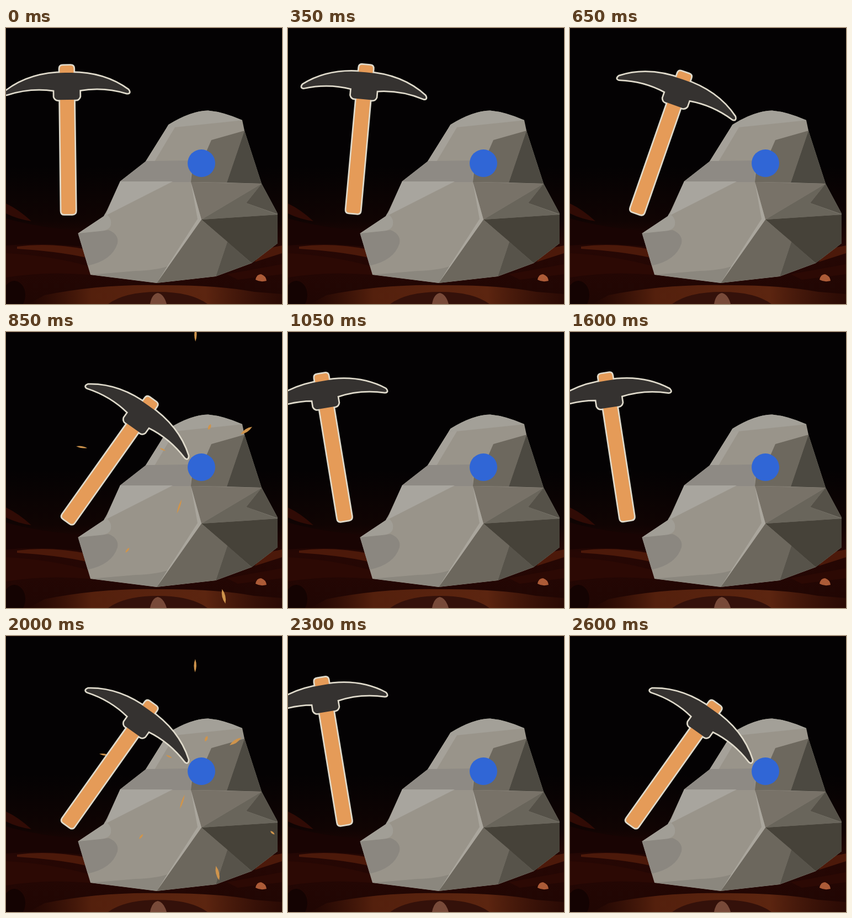
An HTML page that plays this animation: 500x500 px, repeating every 2650 ms.

```html
<!DOCTYPE html>
<html lang="en">
<head>
<meta charset="utf-8">
<title>Pickaxe and rock</title>
<style>
  html, body { margin: 0; width: 100%; height: 100%; overflow: hidden; background: #040203; }
  svg { display: block; width: 100vw; height: 100vh; }
  .outline { fill: none; stroke: #dfdacb; stroke-width: 5.5; stroke-linejoin: round; }
</style>
</head>
<body>
<svg viewBox="0 0 500 500">
  <defs>
    <linearGradient id="sky" x1="0" y1="0" x2="0" y2="1">
      <stop offset=".5" stop-color="#040203"/>
      <stop offset=".7" stop-color="#100403"/>
      <stop offset=".8" stop-color="#260704"/>
      <stop offset="1" stop-color="#200603"/>
    </linearGradient>
    <linearGradient id="mound" x1="0" y1="0" x2="1" y2="0">
      <stop offset="0" stop-color="#451707" stop-opacity="0"/>
      <stop offset=".25" stop-color="#54200d"/>
      <stop offset=".7" stop-color="#5c2510"/>
      <stop offset="1" stop-color="#3a1107" stop-opacity=".4"/>
    </linearGradient>
    <clipPath id="edge">
      <path id="body" d="M130.500 372L177 341L183 330L207 277.500L253 241.500L294.500 175Q335 150 366 149.500Q394 152 428 167L432 186L463 282L492 336V390L445 426L380 450L273 462L153 447Z"/>
    </clipPath>
    <path id="handle" d="M-12.500 -210V-8Q-12.500 -2.500 -7 -2.500H7Q13 -2.500 13 -8L12.500 -266Q12.500 -271.500 7 -271.500H-7Q-12.500 -271.500 -12.500 -266Z"/>
    <path id="head" d="M0 -258.500Q66 -260 111 -226Q115 -220 109 -220.500Q66 -234 23 -227V-215Q21 -209.500 16 -209.500H-16Q-21 -209.500 -23 -215V-227Q-66 -234 -109 -220.500Q-115 -220 -111 -226Q-66 -260 0 -258.500Z"/>
  </defs>

  <rect width="500" height="500" fill="url(#sky)"/>
  <rect width="500" height="1" fill="#1a0a08"/>
  <g>
    <path d="M0 318Q22 328 46 350Q20 346 0 336Z" fill="#300b05"/>
    <path d="M0 345Q60 362 140 368V396Q60 388 0 394Z" fill="#190403"/>
    <path d="M20 396Q80 388 150 402L146 416Q90 404 20 400Z" fill="#4c190a"/>
    <path d="M0 408Q80 412 152 432V447Q70 440 0 452Z" fill="#2c0904"/>
    <path d="M470 400L500 394V408L450 424Z" fill="#4c190a"/>
    <path d="M400 446L500 428V446L420 456Z" fill="#2c0904"/>
    <path d="M70 484Q170 464 275 466Q380 465 450 478L500 482V500H40Z" fill="url(#mound)"/>
    <path d="M185 500Q215 478 275 478Q335 478 365 500Z" fill="#34110a"/>
    <ellipse cx="15" cy="484" rx="20" ry="26" fill="#140302"/>
    <path d="M261 500Q264 482 275 480Q286 482 291 500Z" fill="#784a39"/>
    <path d="M452 456Q454 446 462 446Q471 449 472 458Q461 461 452 456Z" fill="#ac5b37"/>
  </g>

  <use href="#body" fill="#99948a"/>
  <g clip-path="url(#edge)">
    <path d="M252 242L294 175L306 180L269 242Z" fill="#a5a199"/>
    <path d="M285 180L340 140H400L430 167L295 181Z" fill="#a3a098"/>
    <path d="M254 241L335 240V279H205Z" fill="#8e8a84"/>
    <path d="M432 186L372 203L362 226L338 250L335 279L400 280Z" fill="#6d685e"/>
    <path d="M432 186L464 282L400 280Z" fill="#4c4941"/>
    <path d="M206 278H302L180 340Z" fill="#a8a59e"/>
    <path d="M335 279L463 282L354 347Z" fill="#787268"/>
    <path d="M463 282L435 317L493 338L354 347Z" fill="#69655b"/>
    <path d="M463 282L494 338L435 317Z" fill="#555148"/>
    <path d="M354 347L493 338V392L445 426Z" fill="#464239"/>
    <path d="M354 347L401 387L380 450L273 462Z" fill="#6c675d"/>
    <path d="M401 387L445 426L380 450Z" fill="#57534a"/>
    <path d="M335 279L354 347L273 462L292 432L347 346Z" fill="#aaa69d"/>
    <path d="M153 447L235 440Q270 439 292 432L273 462Z" fill="#8b877e"/>
    <path d="M130 372L186 366Q205 374 202 390Q192 422 146 431Z" fill="#8b8780"/>
    <path d="M130 372L180 336Q192 344 190 356Q188 367 170 368Z" fill="#a19e96"/>
  </g>
  <circle cx="354" cy="245" r="25" fill="#3066d6"/>

  <g id="sparks" fill="#cf944c"></g>
  <g id="pick">
    <g class="outline"><use href="#handle"/><use href="#head"/></g>
    <use href="#handle" fill="#e59b58"/>
    <use href="#head" fill="#353230"/>
  </g>
</svg>
<script>
  const LOOP = 2650, STEP = 50, SWING = 600;
  const REST = -9.3, STRIKE = 35.4;
  const HIT = 115, LIFT = 251, MOVE = 160;   // ms within a swing
  const CHIPS = 9, FLIGHT = 150;

  const pick = document.getElementById('pick');
  const sparks = document.getElementById('sparks');

  function ease(x) {
    const u = Math.min(1, Math.max(0, x));
    return u * u * (3 - 2 * u);
  }

  function seeded(seed) {
    return () => (seed = (seed * 16807) % 2147483647) / 2147483647;
  }

  const random = seeded(41);
  const chips = Array.from({ length: CHIPS }, (_, i) => {
    const el = document.createElementNS('http://www.w3.org/2000/svg', 'path');
    const w = 5 + 10 * random(), h = 2 + 4 * random();
    el.setAttribute('d', `M${-w} 0Q0 ${-h} ${w} 0Q0 ${h} ${-w} 0Z`);
    sparks.append(el);
    return { el, angle: (i + random()) * 360 / CHIPS, reach: 45 + 215 * random() ** 2 };
  });

  // The blow starts just before a swing ends and lands in the next one
  function swingAngle(t) {
    const blow = start => ease((t - start) / MOVE);
    const raised = blow(HIT - MOVE) - blow(LIFT) + blow(SWING + HIT - MOVE);
    return REST + (STRIKE - REST) * raised;
  }

  function drawPick(angle) {
    const x = 119.8 - 0.0275 * (angle - 15) ** 2;
    const y = 336.8 + 0.0146 * (angle - 13) ** 2;
    pick.setAttribute('transform', `translate(${x} ${y}) rotate(${angle})`);
  }

  function drawSparks(age) {
    const flying = age > 0 && age < FLIGHT;
    sparks.style.display = flying ? '' : 'none';
    if (!flying) return;
    const spread = Math.sqrt(age / (HIT - 30));
    for (const { el, angle, reach } of chips) {
      el.setAttribute('transform',
        `translate(340 240) rotate(${angle}) translate(${reach * spread})`);
    }
  }

  function draw(now) {
    const time = Math.floor((now % LOOP) / STEP) * STEP;
    const t = time % SWING;
    const whole = time - t + SWING <= LOOP;   // the cut-off last swing throws no chips
    drawPick(swingAngle(t));
    drawSparks(whole ? t - HIT : 0);
  }

  const start = performance.now();
  function tick() {
    draw(performance.now() - start);
    requestAnimationFrame(tick);
  }
  tick();
</script>
</body>
</html>
```
